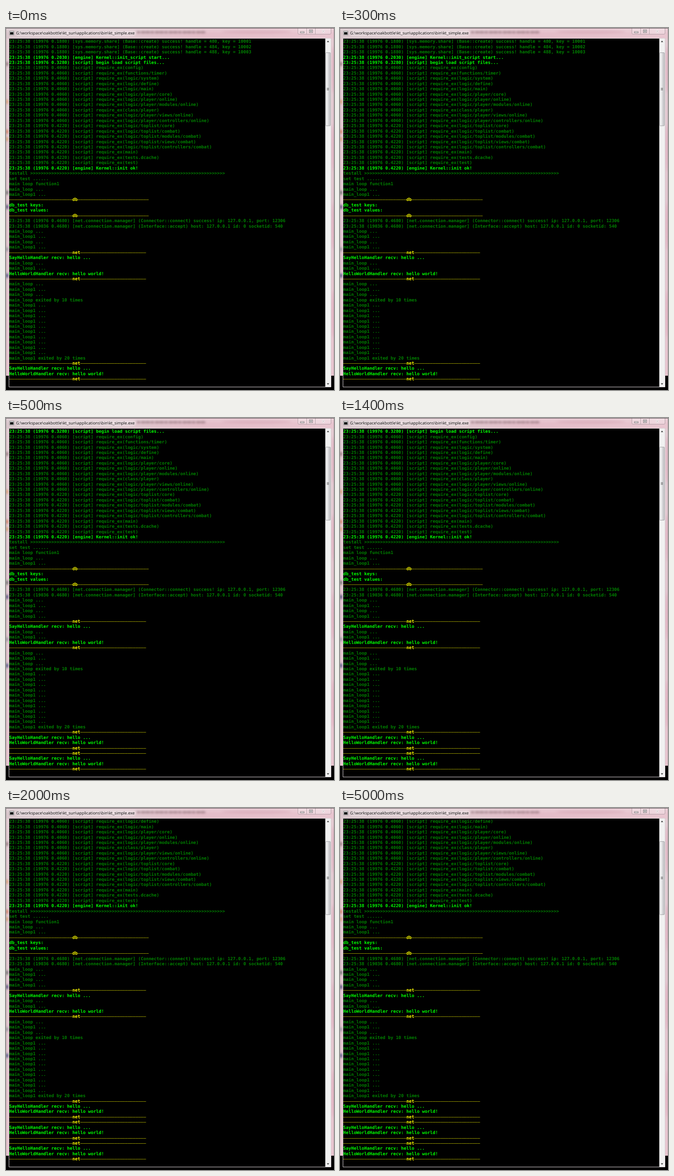
Write an HTML page that moves like this. It is 713 px wide and 785 px high and loops after 7000 ms.

```html
<!DOCTYPE html>
<html lang="en">
<head>
<meta charset="utf-8">
<title>Console</title>
<style>
  html, body { margin: 0; width: 100%; height: 100%; overflow: hidden; background: #000; }
  svg { display: block; width: 713px; height: 785px; }
  text { text-rendering: geometricPrecision; white-space: pre; }
  #rows { font: bold 9.5px "DejaVu Sans Mono", monospace; }
  .dim { fill: #008000; }
  .lit { fill: #00ff00; }
  .rule { fill: #ffff00; }
  .dash { fill: #e0e000; font-weight: normal; }
  .title { font: 8.88px "Open Sans", sans-serif; }
</style>
</head>
<body>
<svg viewBox="0 0 713 785">
  <defs>
    <linearGradient id="glass">
      <stop offset="0" stop-color="#d8c6cb"/>
      <stop offset=".35" stop-color="#e0c8cf"/>
      <stop offset=".6" stop-color="#e4bcc8"/>
      <stop offset="1" stop-color="#e8c6d0"/>
    </linearGradient>
    <linearGradient id="side" x2="0" y2="1">
      <stop offset="0" stop-color="#e4cdd4"/>
      <stop offset=".5" stop-color="#e2c6cf"/>
      <stop offset="1" stop-color="#e8c6d0"/>
    </linearGradient>
    <linearGradient id="sheen" x2="0" y2="1">
      <stop offset="0" stop-color="#fff" stop-opacity=".25"/>
      <stop offset="1" stop-color="#fff" stop-opacity="0"/>
    </linearGradient>
    <linearGradient id="track">
      <stop offset="0" stop-color="#e6e6e6"/>
      <stop offset=".4" stop-color="#f2f2f2"/>
      <stop offset="1" stop-color="#f0f0f0"/>
    </linearGradient>
    <linearGradient id="grab">
      <stop offset="0" stop-color="#f6f6f6"/>
      <stop offset=".5" stop-color="#e6e6e7"/>
      <stop offset=".55" stop-color="#d6d6d8"/>
      <stop offset="1" stop-color="#c8c8cc"/>
    </linearGradient>
    <filter id="blur" x="-1" y="-1" width="3" height="3"><feGaussianBlur stdDeviation="2"/></filter>
    <clipPath id="frame"><path d="M0 0H713V754H0z"/></clipPath>
  </defs>

  <rect width="713" height="785"/>
  <g clip-path="url(#frame)">
    <rect width="713" height="754" fill="url(#side)"/>
    <rect width="713" height="23" fill="url(#glass)"/>
    <g id="blobs" filter="url(#blur)"></g>
    <rect width="713" height="12" fill="url(#sheen)"/>
    <rect width="713" height="1" fill="#5a5054"/>
    <path d="M.5 1V754M712.5 1V754" stroke="#8b7f84" stroke-opacity=".5"/>
  </g>
  <rect x="22" y="6" width="260" height="11" rx="5" fill="#fff" opacity=".4" filter="url(#blur)"/>
  <rect x="8" y="7" width="9" height="8" fill="#e9edf0" stroke="#777"/>
  <rect x="9" y="9" width="7" height="5" fill="#111"/>
  <text class="title" x="22" y="14.2">G:\workspace\oakbottle\kt_sun\applications\bin\kt_simple.exe</text>

  <path d="M634.5 1V11q0 2.500 2.500 2.500H704q2.500 0 2.500-2.500V1M653.500 1V13.500M672.500 1V13.500"
    fill="#fff" fill-opacity=".25" stroke="#a8969d" stroke-width=".8"/>
  <g fill="#fff" stroke="#6b6266" stroke-width=".9">
    <rect x="640" y="8" width="8" height="2.500"/>
    <rect x="659.500" y="4" width="7" height="6"/>
    <rect x="661.500" y="6" width="3" height="2"/>
    <path d="M687 4.500l5.500 5.500M692.500 4.500L687 10" stroke="#fff" stroke-width="2"/>
    <path d="M687 4.500l5.500 5.500M692.500 4.500L687 10" stroke="#b9a9af"/>
  </g>

  <path d="M6.500 22.500H706.500V778.500H6.500z" stroke="#d9d3d6"/>
  <rect x="694" y="23" width="12" height="755" fill="url(#track)"/>
  <path d="M697.500 30.500l2.500-3 2.500 3zM697.500 770.500l2.500 3 2.500-3z" fill="#333"/>
  <g id="thumb">
    <rect x="695" y="53.500" width="10" height="158.500" rx="1" fill="url(#grab)" stroke="#969699" stroke-width=".9"/>
    <path d="M697.500 130.500h4.500m-4.500 2h4.500m-4.500 2h4.500" stroke="#555" stroke-width=".9"/>
  </g>
  <g id="rows"></g>
</svg>

<script>
const LOOP = 7000, PITCH = 11.44, ROWS = 65, LEFT = 7, BASE = 32.2;
const byId = id => document.getElementById(id);
const lines = [];

const add = (kind, ...texts) => texts.forEach(text => lines.push({ kind, text }));
const log = (kind, time, text, id = 19976) => add(kind, `23:25:38 (${id} 0.${time}) ${text}`);
const rule = (name, tail) => add('rule', '–'.repeat(24) + name + '–'.repeat(tail));
const net = () => rule('net', 25);
const db = () => rule('db', 27);
const require = (time, paths) =>
  paths.split(' ').forEach(path => log('dim', time, `[script] require_ex(${path})`));
const loops = pattern => [...pattern].forEach(c => add('dim', `main_loop${c === '1' ? 1 : ''} ...`));
const HELLO = 'SayHelloHandler recv: hello ...';
const WORLD = 'HelloWorldHandler recv: hello world!';

function buildLines() {
  [480, 484, 488].forEach((handle, i) => log('dim', 1880,
    `[sys.memory.share] (Base::create) success! handle = ${handle}, key = ${10001 + i}`));
  log('lit', 2030, '[engine] Kernel::init_script start...');
  log('lit', 3280, '[script] begin load script files...');
  require(4060, 'config functions/timer logic/system logic/define logic/main ' +
    'logic/player/core logic/player/online logic/player/modules/online class/player ' +
    'logic/player/views/online logic/player/controllers/online');
  require(4220, 'logic/toplist/core logic/toplist/combat logic/toplist/modules/combat ' +
    'logic/toplist/views/combat logic/toplist/controllers/combat main tests.dcache test');
  log('lit', 4220, '[engine] Kernel::init ok!');
  add('dim', 'testall ' + '>'.repeat(74), 'set test ......', 'main loop function1');
  loops('01');
  db();
  add('lit', 'db_test keys:', 'db_test values:');
  db();
  log('dim', 4680, '[net.connection.manager] (Connector::connect) success! ip: 127.0.0.1, port: 12306');
  log('dim', 4680, '[net.connection.manager] (Interface::accept) host: 127.0.0.1 id: 0 socketid: 540', 19036);
  loops('0101');
  net();
  add('lit', HELLO);
  loops('01');
  add('lit', WORLD);
  net();
  loops('010');
  add('dim', 'main_loop exited by 10 times');
  loops('1'.repeat(10));
  add('dim', 'main_loop1 exited by 20 times');
  for (let i = 0; i < 3; i++) {
    net();
    add('lit', HELLO, WORLD);
    net();
  }
}

function make(parent, tag, attrs, text = '') {
  const node = document.createElementNS('http://www.w3.org/2000/svg', tag);
  for (const key in attrs) node.setAttribute(key, attrs[key]);
  node.textContent = text;
  parent.append(node);
  return node;
}

// Blurred desktop showing through the window frame
function drawBlobs() {
  const blob = (cx, cy, rx, ry, fill, opacity) =>
    make(byId('blobs'), 'ellipse', { cx, cy, rx, ry, fill, opacity });
  for (let i = 0; i < 15; i++) blob(288 + i * 10, 9, 4 + i % 3, 2.5, '#7d5a64', .6);
  blob(545, 8, 75, 4, '#d29fb0', .5);
  [[78, '#8a6b72'], [160, '#d99a62'], [225, '#d0704a'], [241, '#d99a62'],
   [357, '#56605c'], [388, '#30306a'], [480, '#8a8f9a'], [537, '#2c3c78']]
    .forEach(([y, fill]) => blob(2, y, 3, 5, fill, .8));
  [90, 260, 430, 620].forEach(y => blob(711, y, 4, 50, '#e0a9bb', .5));
}

// Dashes are thinner than the name between them
function drawLine({ kind, text }, i) {
  const row = make(byId('rows'), 'text', { class: kind, x: LEFT, y: BASE + i * PITCH });
  for (const part of text.match(/–+|[^–]+/g))
    make(row, 'tspan', part[0] === '–' ? { class: 'dash' } : {}, part);
}

let shown = -1;
function draw(time) {
  const step = time < 500 ? 0 : time < 2000 ? 1 : 2;
  if (step === shown) return;
  shown = step;
  byId('thumb').setAttribute('transform', `translate(0 ${step * 9.6})`);
  byId('rows').replaceChildren();
  lines.slice(step * 4, step * 4 + ROWS).forEach(drawLine);
}

buildLines();
drawBlobs();
const start = performance.now();
function tick() {
  draw((performance.now() - start) % LOOP);
  requestAnimationFrame(tick);
}
tick();
</script>
</body>
</html>
```
